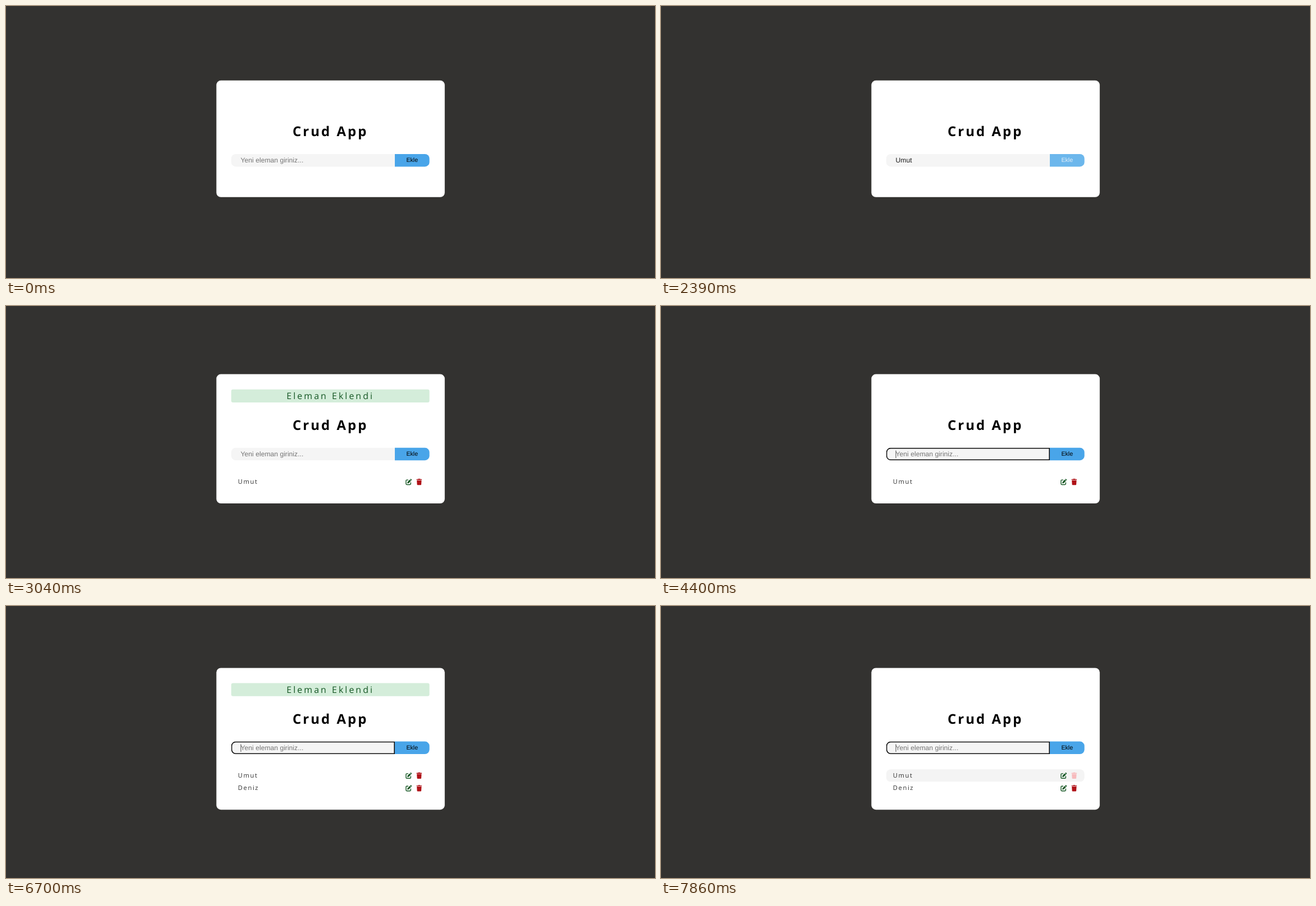
Recreate the animation shown at these times as an HTML page. Size 1155x485 px, loop 8000 ms.

```html
<!DOCTYPE html>
<html lang="tr">
<head>
<meta charset="utf-8">
<title>Crud App</title>
<style>
html, body { margin: 0; width: 100%; height: 100%; overflow: hidden; background: #333230; }
#stage { position: absolute; left: 0; top: 0; transform: scale(.8); transform-origin: 0 0;
  font-family: "Open Sans", "Noto Sans", sans-serif; text-rendering: geometricPrecision; }
#card { position: absolute; left: 468px; width: 508px; background: #fff; border-radius: 10px; }
#card > * { position: absolute; box-sizing: border-box; left: 33px; width: 441px; height: 28px;
  line-height: 28px; text-align: center; white-space: nowrap; }
#card > #alert { top: 34px; height: 29px; line-height: 29px; background: #d4edda; color: #155724;
  border-radius: 4px; font-size: 20px; letter-spacing: 3.75px; }
#card > h1 { top: 93px; height: 40px; margin: 0; line-height: 40px; font-size: 30px; letter-spacing: 3.75px; color: #000; }
#card > #field { top: 164px; width: 364px; padding-left: 21px; display: flex; align-items: center;
  background: #f5f5f5; color: #1c1c1c; border-radius: 10px 0 0 10px; font: 15.2px Arial, "Liberation Sans", sans-serif; }
#field.focus { border-radius: 10px 3px 3px 10px; box-shadow: inset 0 0 0 2px #101010; }
#caret { width: 1px; height: 17px; margin-right: -1px; background: #222; }
#hint { color: #757575; }
#card > #add { top: 164px; left: 397px; width: 77px; border-radius: 0 10px 10px 0;
  font-family: Arial, "Liberation Sans", sans-serif; font-size: 13.33px;
  background: color-mix(in srgb, #6cb7ec var(--hover), #49a5e9);
  color: color-mix(in srgb, #e4eff8 var(--hover), #000); }
#card > .item { text-align: left; padding-left: 15px; border-radius: 10px; font-size: 14px; letter-spacing: 2px;
  color: #333; background: color-mix(in srgb, #f4f4f4 var(--hover), #fff); }
.item svg { position: absolute; top: 7px; height: 14px; overflow: visible; }
.edit { left: 388px; width: 14px; color: #155724; }
.trash { left: 411.5px; width: 12.25px; fill: color-mix(in srgb, #f7bbbd var(--pale, 0%), #b01218); }
</style>
</head>
<body>
<div id="stage">
  <div id="card">
    <div id="alert">Eleman Eklendi</div>
    <h1>Crud App</h1>
    <div id="field"><span id="value"></span><i id="caret"></i><span id="hint">Yeni eleman giriniz...</span></div>
    <div id="add">Ekle</div>
  </div>
</div>
<script>
const LOOP = 8000, ROW = 28;
const typing = [[0, ''], [1540, 'Umut'], [2450, ''], [4430, 'D'], [4790, 'De'],
  [5300, 'Den'], [5500, 'Deni'], [5660, 'Deniz'], [5940, '']];
const added = [[2450, 'Umut'], [5940, 'Deniz']];
const alerts = [[2450, 4400], [5940, 7860]];
const focused = [[1070, 2360], [3990, LOOP]];
const caretOff = [[2050, 2360], [6170, 6700], [7240, 7760]];

const $ = id => document.getElementById(id);
const within = (t, spans) => spans.some(([from, to]) => t >= from && t < to);
const ease = (t, start, length) => 1 - (1 - Math.min(1, Math.max(0, (t - start) / length))) ** 2;
const percent = k => k * 100 + '%';
const show = (el, on) => el.style.display = on ? '' : 'none';

const icons = `
  <svg class="edit" viewBox="0 0 512 512">
    <path fill="none" stroke="currentColor" stroke-width="64" stroke-linecap="round"
      d="M192 96H96Q32 96 32 160V416Q32 480 96 480H352Q416 480 416 416V320"/>
    <path fill="currentColor" d="M339 74 437 172 272 338Q260 350 242 355L152 380Q128 384 132 359L156 270Q162 250 174 238Z
      M362 51 395 18Q420-6 446 18L492 65Q516 92 492 117L460 149Z"/>
  </svg>
  <svg class="trash" viewBox="0 0 448 512">
    <path d="M128 32 136 16Q146 0 164 0H284Q302 0 312 16L320 32H416a32 32 0 0 1 0 64H32a32 32 0 0 1 0-64Z
      M32 128H416L395 467Q390 512 347 512H101Q58 512 53 467Z"/>
  </svg>`;

const items = added.map(([, name], i) => {
  const item = document.createElement('div');
  item.className = 'item';
  item.style.top = 226 + i * ROW + 'px';
  item.innerHTML = name + icons;
  item.style.setProperty('--hover', '0%');
  $('card').append(item);
  return item;
});

function draw(t) {
  const count = added.filter(([at]) => t >= at).length;
  $('card').style.top = 166 - count * ROW / 2 + 'px';
  $('card').style.height = 260 + count * ROW + 'px';
  items.forEach((item, i) => show(item, i < count));

  const text = typing.findLast(([at]) => t >= at)[1];
  const focus = within(t, focused);
  $('value').textContent = text;
  show($('hint'), !text);
  show($('caret'), focus && !within(t, caretOff));
  $('field').classList.toggle('focus', focus);
  show($('alert'), within(t, alerts));

  const hover = t < 2450 ? ease(t, 2050, 340) : 1 - ease(t, 2450, 600);
  $('add').style.setProperty('--hover', percent(hover));
  items[0].style.setProperty('--hover', percent(ease(t, 7260, 400)));
  items[0].style.setProperty('--pale', percent(ease(t, 7340, 480)));
}

function frame() {
  draw(performance.now() % LOOP);
  requestAnimationFrame(frame);
}
frame();
</script>
</body>
</html>
```
